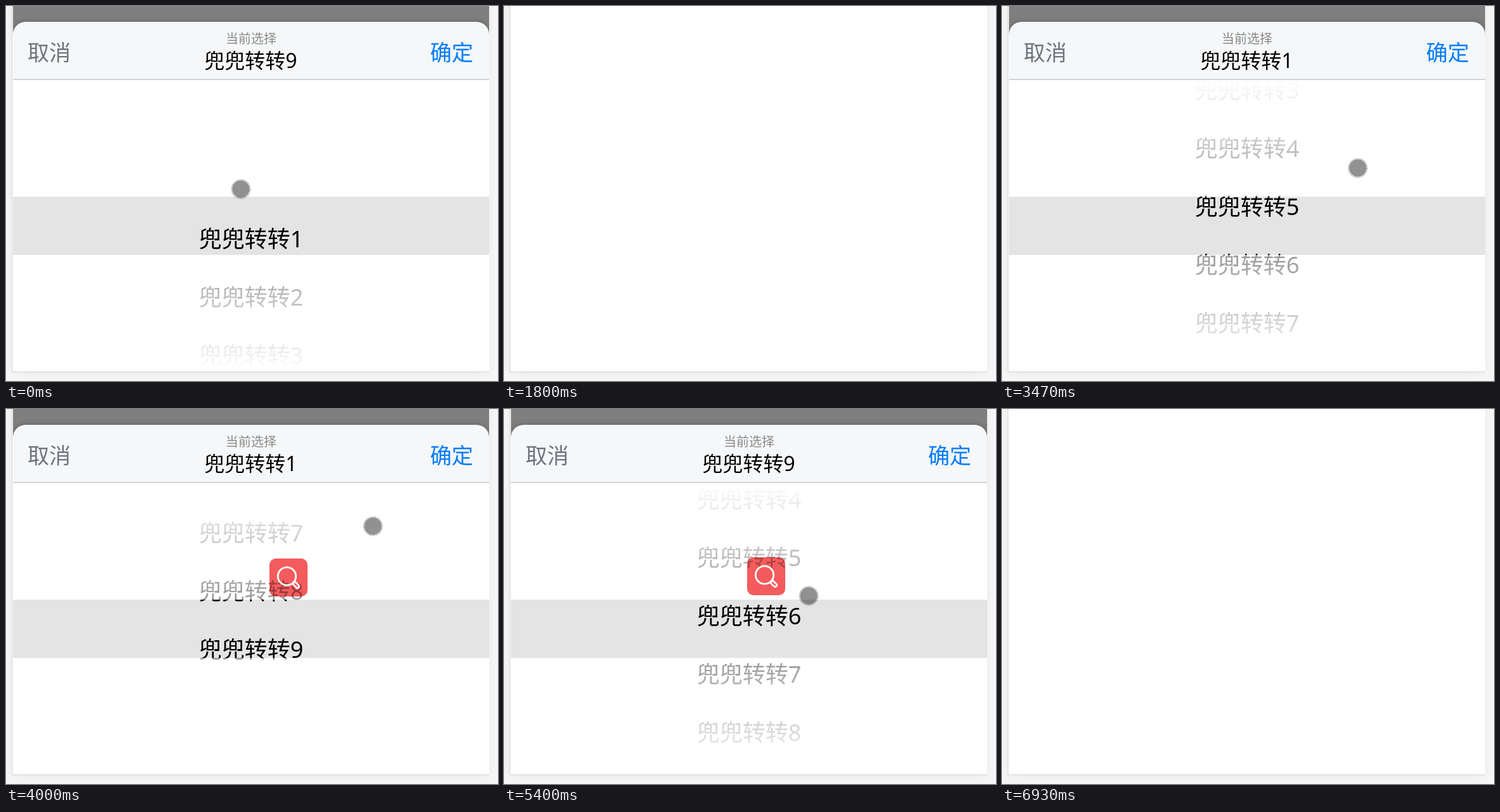
Animation, 775 px wide and 592 px high, one loop 7590 ms. Source, as an HTML page:

```html
<!DOCTYPE html>
<html lang="zh">
<head>
<meta charset="utf-8">
<style>
  html, body { margin: 0; width: 100%; height: 100%; overflow: hidden; background: #f7f7f7; }
  svg { display: block; width: 775px; height: 592px; }
  text { font-family: "Noto Sans", "Noto Sans CJK SC", "Noto Sans CJK", sans-serif; }
  .mid { text-anchor: middle; }
  #items { font-size: 36px; }
  #head { filter: drop-shadow(0 0 5px rgba(0, 0, 0, .25)); }
  #frame { filter: drop-shadow(0 2px 9px rgba(0, 0, 0, .06)); }
  #icon rect { mix-blend-mode: multiply; }
</style>
</head>
<body>
<svg viewBox="0 0 775 592">
  <defs>
    <clipPath id="screen"><rect x="11" width="750" height="577"/></clipPath>
    <clipPath id="list"><rect x="11" y="117" width="750" height="460"/></clipPath>
    <linearGradient id="fade" x2="0" y2="1">
      <stop stop-color="#fff"/>
      <stop offset="1" stop-color="#fff" stop-opacity=".6"/>
    </linearGradient>
  </defs>
  <rect id="frame" x="9" y="-30" width="752" height="608" fill="#d4d4d4"/>
  <rect x="10" width="751" height="577" fill="#fff"/>
  <g clip-path="url(#screen)">
    <rect id="shade" x="11" width="750" height="577"/>
    <g id="sheet">
      <path id="head" d="M11 577V45a20 20 0 0 1 20-20H741a20 20 0 0 1 20 20V577z" fill="#f5f7f9"/>
      <rect x="11" y="115" width="750" height="2" fill="#d2d4d6"/>
      <rect x="11" y="117" width="750" height="460" fill="#fff"/>
      <text x="34" y="86" font-size="34" fill="#6c757d">取消</text>
      <text x="736" y="86" font-size="34" fill="#007bff" text-anchor="end">确定</text>
      <text class="mid" x="386" y="58.5" font-size="20" fill="#888">当前选择</text>
      <text class="mid" x="385.5" y="98" font-size="32" id="title"></text>
      <rect x="11" y="301" width="750" height="92" fill="#e4e4e4"/>
      <g clip-path="url(#list)"><g id="items"></g></g>
      <rect x="11" y="117" width="750" height="184" fill="url(#fade)"/>
      <rect x="11" y="117" width="750" height="184" fill="url(#fade)" transform="matrix(1 0 0 -1 0 694)"/>
    </g>
    <g id="icon" fill="none" stroke-linecap="round">
      <rect width="60" height="60" rx="10" fill="#f45b5d"/>
      <circle cx="27.5" cy="28" r="14.2" stroke="#fff" stroke-width="2.8"/>
      <path d="M39.5 39.5l4.5 4.5" stroke="#fff" stroke-width="8"/>
      <path d="M40 40l4 4" stroke="#f45b5d" stroke-width="2.5"/>
    </g>
    <g id="cursor">
      <circle r="13.5" fill-opacity=".43"/>
      <circle r="14.5" fill="none" stroke="#000" stroke-opacity=".26" stroke-width="2.4" stroke-dasharray="2.2 1"/>
    </g>
  </g>
</svg>
<script>
const LOOP = 7590, STEP = 200 / 3, ROW = 92;
const $ = id => document.getElementById(id);
const label = n => '兜兜转转' + n;

// Moves: [start, duration, ...end]; each continues from where the last one led.
const flicks = [[0, 333, 1], [333, 819, 7], [1850, 1, 0], [3100, 1130, 8], [4892, 708, 5]];
const strokes = [[200, 630, 140, 85], [930, 200, 72, 77], [1530, 250, 470, 620], [2870, 1000, 578, 185],
  [4130, 1, 490, 170], [4870, 400, 480, 295], [5430, 450, 710, 89], [6060, 500, 540, 620],
  [6860, 1, 250, 515], [6930, 1, 250, 620]];
// [start, x, y]
const icons = [[460, 375, 179], [3860, 415, 236], [5160, 383, 234]];

for (let n = 1; n <= 9; n++)
  $('items').innerHTML += `<text class="mid" x="386" y="${362.5 + ROW * (n - 1)}">${label(n)}</text>`;

function easeOut(t, start, duration, power = 2) {
  const p = Math.min(1, Math.max(0, (t - start) / duration));
  return 1 - (1 - p) ** power;
}

const follow = (moves, origin, t) => moves.reduce((at, [start, duration, ...end]) =>
  at.map((v, i) => v + (end[i] - v) * easeOut(t, start, duration)), origin);

const slide = (t, start) => easeOut(t, start, 300, 3);
const move = (id, x, y) => $(id).setAttribute('transform', `translate(${x} ${y})`);
const show = (id, on) => $(id).setAttribute('visibility', on ? 'visible' : 'hidden');

function draw(t) {
  const open = 1 - slide(t, 1500) + slide(t, 2533) - slide(t, 6040);
  move('sheet', 0, 595 * (1 - open));
  show('sheet', open > .001);
  $('shade').setAttribute('opacity', open / 2);

  const [row] = follow(flicks, [-.2], t);
  move('items', 0, -ROW * row);
  const settled = flicks.findLast(([start, duration]) => start + duration <= t);
  $('title').textContent = label(settled ? settled[2] + 1 : 9);

  const icon = icons.find(([start]) => t >= start && t < start + 700);
  show('icon', icon);
  if (icon) move('icon', icon[1], icon[2]);
  move('cursor', ...follow(strokes, [370, 289], t));
}

const begin = performance.now();
function tick() {
  const t = (performance.now() - begin) % LOOP;
  draw(Math.floor((t + 4) / STEP) * STEP);
  requestAnimationFrame(tick);
}
tick();
</script>
</body>
</html>
```
